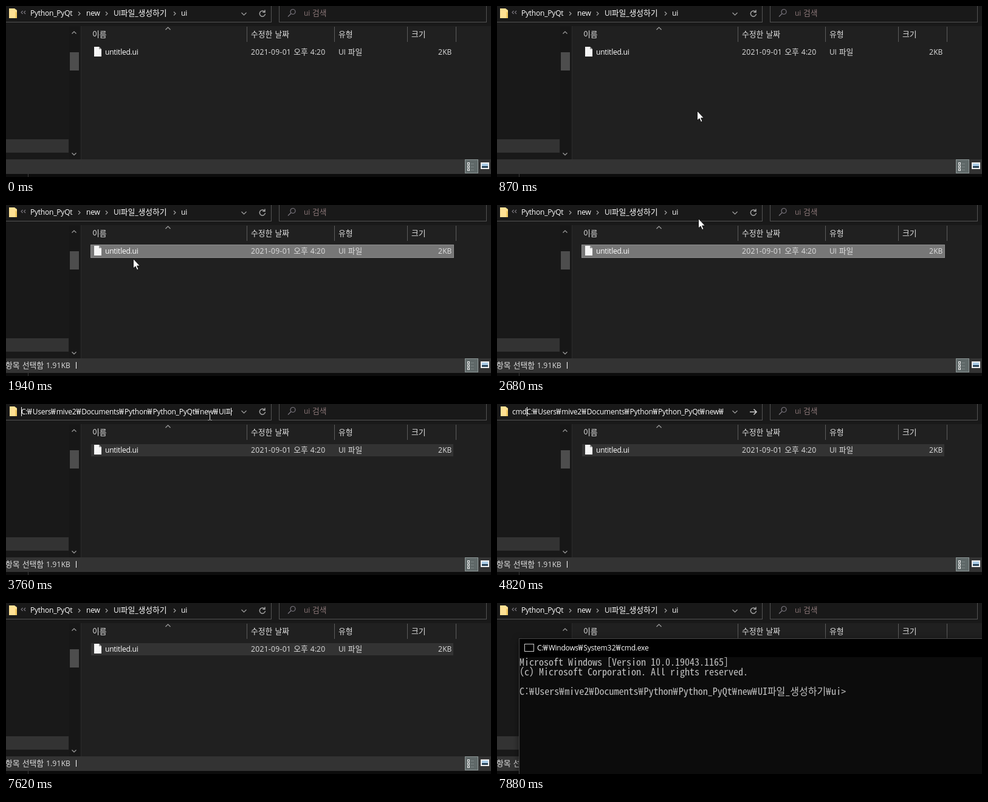
Animation of 798x281 px, one loop 8000 ms. Source, as an HTML page:

```html
<!DOCTYPE html>
<html lang="ko">
<head>
<meta charset="utf-8">
<style>
  html, body { margin: 0; width: 100%; height: 100%; overflow: hidden; background: #191919; }
  svg { display: block; }
  rect { shape-rendering: crispEdges; }
  text { font: 12px "Open Sans", "Noto Sans CJK KR", "Noto Sans CJK", sans-serif; letter-spacing: -.22px; word-spacing: 1.2px; white-space: pre; fill: #fff; }
  .hangul { font: 12.8px "Noto Sans CJK KR", "Noto Sans CJK", sans-serif; letter-spacing: 0; }
  .digit { font-size: 12.2px; letter-spacing: .25px; }
  .won { font: 12.8px "Noto Sans CJK KR", "Noto Sans CJK", sans-serif; letter-spacing: 1.2px; }
  .soft { fill: #dedede; }
  .console { font: 16px "Noto Sans Mono CJK KR", "Noto Sans CJK KR", monospace; letter-spacing: 0; word-spacing: 0; fill: #c4c4c4; }
  .console .won { font: inherit; letter-spacing: 1.1px; }
  .line { fill: none; stroke: #a0a0a0; stroke-width: 1.2; }
  .dim { stroke: #7c7880; }
  #ibeam { mix-blend-mode: difference; }
  #cmd { filter: drop-shadow(0 3px 6px #0008); }
</style>
</head>
<body>
<script>
const FOLDER = "C:₩Users₩mive2₩Documents₩Python₩Python_PyQt₩new₩UI파일_생성하기₩ui";

const styled = s => s
  .replace(/[가-힣]+|[\d-]+|₩/g, m =>
    `<tspan class="${m === "₩" ? "won" : /\d/.test(m) ? "digit" : "hangul"}">${m}</tspan>`);
const text = (x, y, s, attrs = "") => `<text x="${x}" y="${y}" ${attrs}>${styled(s)}</text>`;
const rect = (x, y, w, h, fill, attrs = "") =>
  `<rect x="${x}" y="${y}" width="${w}" height="${h}" fill="${fill}" ${attrs}/>`;
const line = (d, kind = "") => `<path class="line ${kind}" d="${d}"/>`;
const consoleLine = (row, s) =>
  `<text class="console" x="37" y="${103 + row * 16}">${s.replace(/₩/g, '<tspan class="won">₩</tspan>')}</text>`;

const frameColor = "#535353";
const soft = 'class="soft"';

const toolbar = [
  rect(-1.5, -5.5, 438, 32, "#191919", `stroke="${frameColor}"`),
  rect(449.5, -5.5, 341, 32, "#191919", `stroke="${frameColor}"`),
  `<path d="M5 4H14L18 7V20H5Z" fill="#ffe194"/><path d="M15 9L18 11V20H15Z" fill="#f2cb66"/>`,
  line("M387.5 11L391.5 15L395.5 11"),
  `<circle class="line dim" cx="472" cy="9.5" r="4"/>`,
  line("M469 12.5L464 17.5", "dim"),
  text(490, 16, "ui 검색", 'style="fill:#8a7677"')
].join("");

const sidebar = [
  rect(0, 33, 123, 219, "#191919"),
  rect(104, 34, 17, 218, "#171717"),
  rect(105, 76, 15, 30, "#4d4d4d"),
  rect(0, 219, 103, 22, "#333"),
  rect(123, 33, 1, 219, "#2b2b2b"),
  line("M108.5 45.5L112 42L115.5 45.5"),
  line("M108.5 241.5L112 245L115.5 241.5")
].join("");

const list = [
  rect(124, 33, 674, 219, "#202020"),
  ...[396, 540, 660, 740].map(x => rect(x, 34, 1, 25, "#5c5c5c")),
  line("M262.5 39L266.5 35L270.5 39"),
  text(142, 51, "이름", soft), text(403, 51, "수정한 날짜", soft),
  text(547, 51, "유형", soft), text(667, 51, "크기", soft),
  rect(139.5, 65.5, 597, 21, "none", 'id="row"'),
  `<path d="M145 67H153L157 71V83H145Z" fill="#f5f5f5"/><path d="M153 67V71H157Z" fill="#9a9a9a"/>`,
  text(163, 80, "untitled.ui"),
  text(403, 80, "2021-09-01 오후 4:20", soft),
  text(547, 80, "UI 파일", soft),
  text(733, 80, "2KB", soft + ' text-anchor="end"')
].join("");

const statusBar = [
  rect(0, 252, 798, 24, "#333"),
  rect(0, 276, 798, 5, "#0c0c0c"),
  rect(36, 276, 1, 5, "#3a3a3a"),
  `<g id="status">${text(-1, 268, "항목 선택함 1.91KB", soft)}${rect(115, 258, 1, 11, "#fff")}</g>`,
  rect(755.5, 252.5, 21, 22, "#5f6868", 'stroke="#8c9696"'),
  ...[257, 262, 267].map(y =>
    rect(759.5, y + .5, 3, 3, "none", 'stroke="#eee"') + rect(765, y + 2, 5, 1, "#7a8484")),
  rect(781, 257, 14, 11, "#eee"),
  rect(783, 259, 10, 4, "#a9cbe6"),
  rect(783, 263, 10, 3, "#2a4458")
].join("");

const crumbs = `<g id="crumbs">` + [
  line("M27.5 8L25 10.5L27.5 13M32 8L29.5 10.5L32 13", "dim"),
  text(40, 16, "Python_PyQt"), text(132, 16, "new"),
  text(177, 16, "UI파일_생성하기"), text(288, 16, "ui"),
  ...[119, 164, 276].map(x => line(`M${x} 9.5L${x + 3} 12.5L${x} 15.5`))
].join("") + `</g>`;

const editor = `<g id="editor">` + [
  rect(2, 1, 4, 24, "#191919"), rect(19, 1, 5, 24, "#191919"),
  rect(25, 5, 348, 16, "#39f", 'id="selection"'),
  `<g clip-path="url(#field)">${text(25, 17, FOLDER, 'id="path"')}</g>`,
  rect(25, 5, 1, 15, "#fff", 'id="caret"')
].join("") + `</g>`;

const cmd = `<g id="cmd">` + [
  rect(36, 58, 780, 240, "#454545"),
  rect(37, 59, 780, 30, "#000"),
  rect(37, 89, 780, 210, "#0c0c0c"),
  rect(45.5, 67.5, 15, 12, "#000", 'stroke="#ccc"'),
  text(66, 78, "C:₩Windows₩System32₩cmd.exe"),
  consoleLine(0, "Microsoft Windows [Version 10.0.19043.1165]"),
  consoleLine(1, "(c) Microsoft Corporation. All rights reserved."),
  consoleLine(3, FOLDER + "&gt;")
].join("") + `</g>`;

document.body.innerHTML = `<svg width="798" height="281" viewBox="0 0 798 281">
  <clipPath id="field"><rect x="25" y="0" width="348" height="26"/></clipPath>
  ${rect(0, 0, 798, 281, "#191919")}${toolbar}${sidebar}${list}${statusBar}${crumbs}${editor}
  <path id="refresh" class="line" d="M425.4 9.6A4.6 4.6 0 1 0 426.5 13M426 6.5V10.3H422.2" style="stroke-width:1.5"/>
  <path id="go" class="line" d="M416 13H427M422.5 8.5L427 13L422.5 17.5" style="stroke:#ccc;stroke-width:1.6"/>
  ${cmd}
  <path id="ibeam" d="M332 11.5H334.5L335.5 12.5L336.5 11.5H339M335.5 12V26M332 26.5H334.5L335.5 25.5L336.5 26.5H339" fill="none" stroke="#fff"/>
  <path id="arrow" d="M.5 .5V16L4 12.8L6.6 18.5L9 17.5L6.5 12H11.3Z" fill="#fff" stroke="#000" stroke-width=".8"/>
</svg>`;

const el = id => document.getElementById(id);
const show = (id, on) => { el(id).style.display = on ? "" : "none"; };
const within = (t, ...spans) => spans.some(([a, b]) => t >= a && t < b);

// Pointer moves: start, end, number of steps, from, to
const moves = [
  [110, 330, 4, [593, 293], [369, 200]],
  [740, 1205, 8, [369, 200], [209, 88]],
  [2420, 2675, 5, [209, 88], [331, 22]],
  [2750, 2751, 1, [331, 22], [335, 18]]
];

function pointer(t) {
  let pos = [593, 293];
  for (const [start, end, steps, from, to] of moves) {
    if (t < start) break;
    const step = Math.min(steps, 1 + Math.floor((t - start) / (end - start) * (steps - 1)));
    pos = from.map((v, i) => Math.round(v + (to[i] - v) * step / steps));
  }
  return pos;
}

const typedAt = [4420, 4620, 4820, 5150];
let shownPath = "";

function setPath(typed, atEnd) {
  const key = typed + atEnd;
  if (key === shownPath) return;
  shownPath = key;
  const path = el("path");
  path.innerHTML = styled(typed + FOLDER);
  path.setAttribute("x", atEnd ? 373 : 25);
  path.setAttribute("text-anchor", atEnd ? "end" : "start");
  const offset = typed ? path.getSubStringLength(0, typed.length) : 0;
  el("caret").setAttribute("x", Math.round(25 + offset));
}

function draw(t) {
  const editing = within(t, [3020, 7080]);
  const selected = within(t, [3020, 3630], [6880, 7080]);
  const goShown = within(t, [4420, 7080]);

  show("crumbs", !editing);
  show("editor", editing);
  show("selection", selected);
  show("caret", within(t, [3630, 4290], [4420, 5610], [6160, 6690]));
  show("refresh", !goShown);
  show("go", goShown);
  if (editing) {
    const count = selected ? 0 : typedAt.filter(at => t >= at).length;
    setPath("cmd ".slice(0, count), selected);
  }

  const [fill, stroke] = t < 1470 ? ["none", "none"]
    : t < 1610 ? ["#4d4d4d", "#4d4d4d"]
    : t < 2890 ? ["#777", "#8c8c8c"] : ["#333", "#202020"];
  el("row").setAttribute("fill", fill);
  el("row").setAttribute("stroke", stroke);
  show("status", t >= 1740);

  show("ibeam", within(t, [3170, 4620], [5480, 7080]));
  show("arrow", within(t, [110, 3020], [7080, 7620]));
  el("arrow").setAttribute("transform", `translate(${pointer(t)})`);
  show("cmd", t >= 7880);
}

const began = performance.now();
function tick() {
  draw((performance.now() - began) % 8000);
  requestAnimationFrame(tick);
}
tick();
</script>
</body>
</html>
```
